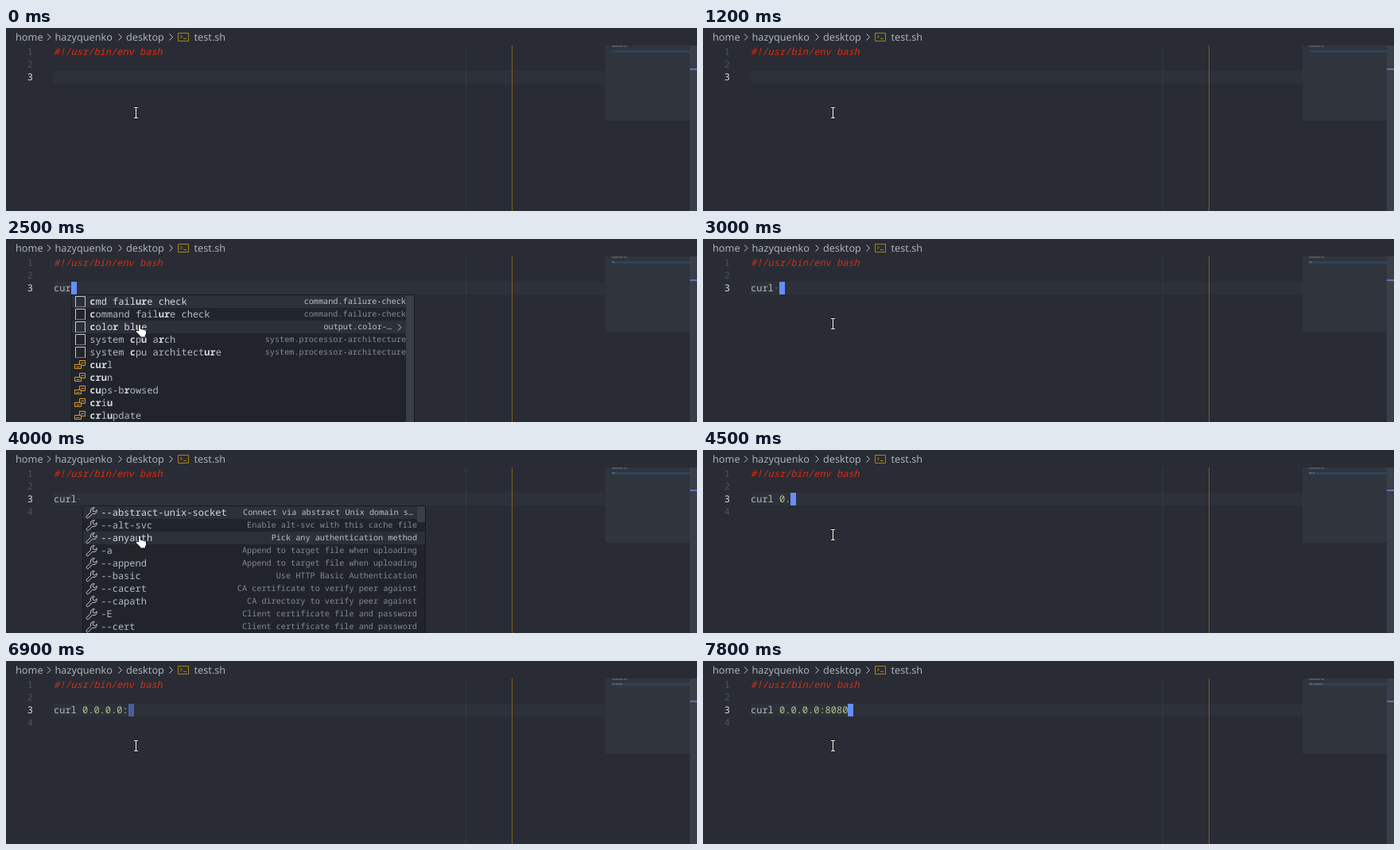
Recreate the animation shown at these times as an HTML page. Size 869 by 231 pixels, loop 8000 ms.

```html
<!DOCTYPE html>
<html lang="en">
<head>
<meta charset="utf-8">
<title>Shell completion</title>
<style>
  html, body { margin: 0; width: 100%; height: 100%; overflow: hidden; background: #292c34; }
  svg { display: block; width: 869px; height: 231px; }
  text { white-space: pre; text-rendering: geometricPrecision; fill: #b2b8c3; }
  .ui { font: 12.7px "Noto Sans", "Open Sans", sans-serif; fill: #abb0b9; }
  .code { font: 12px "Noto Sans Mono", "DejaVu Sans Mono", monospace; }
  .detail { font: 10.2px "Noto Sans Mono", "DejaVu Sans Mono", monospace; fill: #838892; text-anchor: end; }
  .lit { fill: #bbc0c9; }
  .hit { font-weight: 700; fill: #d5d8de; }
  .num { fill: #495162; }
  .on { fill: #d7dae0; }
  .line { fill: none; stroke: #c5c8ce; }
</style>
</head>
<body>
<svg id="stage" viewBox="0 0 869 231" xmlns="http://www.w3.org/2000/svg"></svg>
<script>
const LOOP = 8000, CHAR = 7.2, LEFT = 60, ROW = 16;
const stage = document.getElementById('stage');

// Rows are "label|detail"; asterisks enclose matched letters.
const popups = {
  c: { icon: 'snippet', thumb: 20, rows: [
    '*c*md|command.run', '*c*md failure check|command.failure-check', '*c*md nice|command.…',
    '*c*md renice|command.renice', '*c*md substitution|command.run',
    '*c*md success check|command.success-check', '*c*olor black|output.color-black',
    '*c*olor blue|output.color-blue', '*c*olor cyan|output.color-cyan', '*c*olor green|output.color-green'] },
  cu: { icon: 'snippet', thumb: 60, rows: [
    '*c*md fail*u*re check|command.failure-check', '*c*md s*u*bstitution|command.run',
    '*c*md s*u*ccess check|command.…', '*c*olor bl*u*e|output.color-blue',
    '*c*ommand fail*u*re check|command.failure-check', '*c*ommand s*u*bstitution|command.run',
    '*c*ommand s*u*ccess check|command.success-check', 'system *c*p*u* arch|system.processor-architecture',
    'system *c*p*u* architecture|system.processor-architecture', '*cu*rl'] },
  cur: { icon: 'snippet', thumb: 160, rows: [
    '*c*md fail*ur*e check|command.failure-check', '*c*ommand fail*ur*e check|command.failure-check',
    '*c*olo*r* bl*u*e|output.color-…', 'system *c*p*u* a*r*ch|system.processor-architecture',
    'system *c*pu architect*ur*e|system.processor-architecture',
    '*cur*l', '*cru*n', '*cu*ps-b*r*owsed', '*cr*i*u*', '*cr*l*u*pdate'] },
  curl: { icon: 'snippet', thumb: 0, rows: ['*curl*'] },
  flags: { icon: 'wrench', thumb: 20, rows: [
    '--abstract-unix-socket|Connect via abstract Unix domain s…', '--alt-svc|Enable alt-svc with this cache file',
    '--anyauth|Pick any authentication method', '-a|Append to target file when uploading',
    '--append|Append to target file when uploading', '--basic|Use HTTP Basic Authentication',
    '--cacert|CA certificate to verify peer against', '--capath|CA directory to verify peer against',
    '-E|Client certificate file and password', '--cert|Client certificate file and password'] },
  zero: { icon: 'wrench', thumb: 0, rows: [
    '-*0*|Use HTTP 1.0', '--http1.*0*|Use HTTP 1.0',
    '--proxy1.*0*|Use HTTP/1.0 proxy on given port', '--tlsv1.*0*|Use TLSv1.0 or greater'] }
};

// [time, typed text, caret opacity, popup]
const steps = [
  [0, '', 0], [500, '', 1], [1100, '', .5], [1200, '', 0], [1700, '', .5], [1800, '', 1],
  [2100, 'c', 1, 'c'], [2200, 'cu', 1, 'c'], [2300, 'cu', 1, 'cu'], [2500, 'cur', 1, 'cur'],
  [2700, 'curl', 1, 'curl'], [3000, 'curl ', 1], [3100, 'curl ', 1, 'flags'],
  [3600, 'curl ', .75, 'flags'], [3700, 'curl ', .4, 'flags'], [3800, 'curl ', 0, 'flags'],
  [4100, 'curl 0', 1, 'zero'], [4500, 'curl 0.', 1], [4600, 'curl 0.0', 1], [4700, 'curl 0.0.', 1],
  [4800, 'curl 0.0.0', 1], [5000, 'curl 0.0.0.', 1], [5500, 'curl 0.0.0.0', 1],
  [6100, 'curl 0.0.0.0:', 1], [6900, 'curl 0.0.0.0:', .5], [7000, 'curl 0.0.0.0:', 0],
  [7200, 'curl 0.0.0.0:8', 1], [7400, 'curl 0.0.0.0:80', 1],
  [7700, 'curl 0.0.0.0:808', 1], [7800, 'curl 0.0.0.0:8080', 1]
];
const SAVED = 4000;

const rect = (x, y, w, h, fill, more = '') =>
  `<rect x="${x}" y="${y}" width="${w}" height="${h}" fill="${fill}" ${more}/>`;
const text = (x, y, cls, s, more = '') => `<text x="${x}" y="${y}" class="${cls}" ${more}>${s}</text>`;
const chevron = (x, y, r = 4) => `<path class="line" d="M${x - r / 2} ${y - r}l${r} ${r}l${-r} ${r}"/>`;
const marked = s => s.split('*').map((p, i) => i % 2 ? `<tspan class="hit">${p}</tspan>` : p).join('');

const icons = {
  snippet: '<path class="line" d="M1.5 14V1.5h12V14"/><path class="line" stroke-dasharray="1 1" d="M1 14.5h13"/>',
  value: '<g fill="#21252b" stroke="#dc9a2c"><path d="M6.5 2.500h7v6h-7z"/><path d="M.5 7.500h8v5h-8z"/>' +
    '<path d="M8.500 5.500h3.500M2.500 10.500h4"/></g>',
  wrench: '<path class="line" d="M11.3 1.8A4 4 0 0 0 6.6 7.2L1.600 12.200A1.400 1.400 0 0 0 3.800 14.400L8.800 9.400A4 4 0 0 0 14.200 4.700L11.900 7 9.700 6.300 9 4.100Z"/>'
};

const beam = 'M161 100.500h2l.5.500.5-.500h2M161 113.500h2l.5-.500.5.500h2M163.500 101v12';
const ibeam = `<path d="${beam}" fill="none" stroke="#111" stroke-width="2.600"/>` +
  `<path d="${beam}" fill="none" stroke="#f4f4f4" stroke-width="1.200"/>`;
const hand = '<path d="M166.500 116v-6.500q0-1.700 1.500-1.700t1.500 1.700v4l1.700.200 1.700.500 1.700.500q2 .600 2 2.300v2.500l-1.300 2.500v2h-6.800v-1.700l-4.800-4.800q-1-1.700.4-2.300 1-.300 2.400.800z" fill="#fff" stroke="#0c0d10"/>';

function frame() {
  return text(12, 16, 'ui', 'home') + chevron(54, 11.5) +
    text(61.5, 16, 'ui', 'hazyquenko') + chevron(143.5, 11.5) +
    text(151, 16, 'ui', 'desktop') + chevron(207.5, 11.5) +
    '<path d="M216.500 6.500h13v10h-13zM219 9l2.500 2-2.500 2M223 13.500h4" fill="none" stroke="#a8831f"/>' +
    text(236.5, 16, 'ui', 'test.sh');
}

function editor(typed, saved) {
  const cmd = typed.slice(0, 5), arg = typed.slice(5);
  let out = rect(LEFT, 54, 694, ROW, '#2d313a');
  out += rect(578, 22, 1, 209, '#2e3f36') + rect(636, 22, 1, 209, '#7c601c');
  for (let n = 1; n <= (saved ? 4 : 3); n++)
    out += text(26.7, 18 + n * ROW, 'code ' + (n === 3 ? 'on' : 'num'), n);
  out += text(LEFT, 34, 'code', '#!/usr/bin/env bash', 'style="fill:#dc2c12;font-style:italic"');
  out += text(LEFT, 66, 'code', cmd + `<tspan fill="#adc78a">${arg}</tspan>`);
  // Trailing whitespace shows as a faint dot.
  if (typed.endsWith(' ')) out += rect(LEFT + 4.5 * CHAR - 1, 61, 2, 2, '#444a57');
  return out;
}

function minimap(typed, saved) {
  let out = rect(754, 22, 106, 95, '#30343d') + rect(762, 28, 98, 3, '#2f4359');
  out += rect(762, 22, 14, 2, '#50555e') + rect(777, 22, 4, 2, '#50555e');
  if (typed) {
    out += rect(762, 28, Math.min(typed.length, 4), 2, '#4b6278');
    if (typed.length > 5) out += rect(767, 28, typed.length - 5, 2, '#4b6278');
  }
  return out + rect(860, 22, 9, 209, '#3a3e48') + rect(860, saved ? 50 : 51, 9, 2, '#6272b4');
}

function popup(name, x) {
  const { icon, thumb, rows } = popups[name];
  const h = rows.length * ROW;
  let out = rect(x + .5, 70.5, 431, h + 1, '#21252b', 'stroke="#181a1f"');
  rows.forEach((row, i) => {
    const y = 71 + i * ROW;
    const [label, detail = ''] = row.split('|');
    const hover = i === 2, lit = i === 0 || hover;
    const cut = detail.endsWith('…');
    const kind = detail ? icon : 'value';
    if (lit) out += rect(x + 1, y, 430, ROW, '#2c3039');
    out += `<g transform="translate(${x + 4} ${y})">${icons[kind]}</g>`;
    out += text(x + 23.3, y + 12, 'code' + (lit ? ' on' : ''), marked(label));
    if (detail) {
      const end = x + (cut ? (hover ? 403 : 416) : 421);
      out += text(end, y + 11, 'detail' + (lit ? ' lit' : ''), detail);
    }
    if (hover && cut) out += chevron(x + 413, y + 8.5);
  });
  return out + rect(x + 421, 71, 10, thumb, '#3a3e47');
}

function draw(t) {
  const [, typed, caret, open] = steps.filter(s => s[0] <= t).pop();
  const saved = t >= SAVED;
  const x = Math.round(LEFT + typed.length * CHAR);
  return rect(0, 0, 869, 231, '#292c34') + frame() + editor(typed, saved) + minimap(typed, saved) +
    rect(x, 54, 7, ROW, '#668efb', `opacity="${caret}"`) +
    (open ? popup(open, x) + hand : ibeam);
}

let last = '';
function tick() {
  const svg = draw(performance.now() % LOOP);
  if (svg !== last) stage.innerHTML = last = svg;
  requestAnimationFrame(tick);
}
tick();
</script>
</body>
</html>
```
